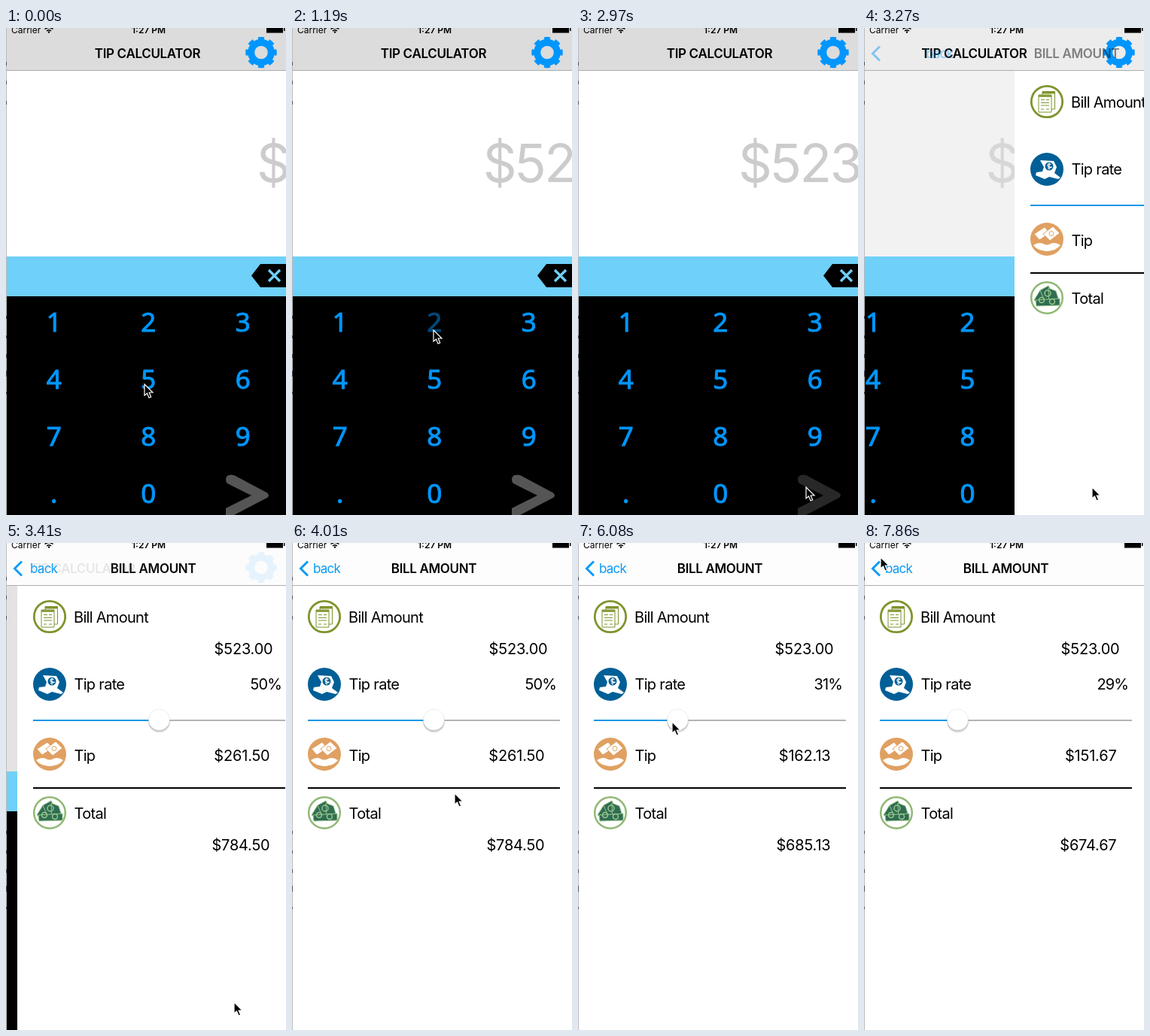
An HTML page that plays this animation: 372x648 px, repeating every 8 s.

```html
<!DOCTYPE html>
<html lang="en">
<head>
<meta charset="utf-8">
<title>Tip calculator</title>
<style>
  html, body { margin: 0; width: 100%; height: 100%; overflow: hidden; background: #fff; }
  svg { display: block; width: 372px; height: 648px; }
  text { font: 20px Inter, sans-serif; letter-spacing: -.035em; }
  .num { letter-spacing: -.01em; text-anchor: end; }
  #rate { letter-spacing: -.045em; }
  #back { font-size: 17px; letter-spacing: -.045em; }
  .title { font-size: 17px; font-weight: 600; letter-spacing: -.02em; text-anchor: middle; }
  .small { font-size: 12px; letter-spacing: 0; }
  .bold { font-weight: 600; }
  .key { font: 35px "Noto Sans", sans-serif; letter-spacing: 0; text-anchor: middle; fill: #0096fd; stroke: #0096fd; stroke-width: 1; }
  #entry { font-size: 70px; letter-spacing: -.035em; text-anchor: end; fill: #ccc; }
</style>
</head>
<body>
<svg viewBox="0 0 372 648">
  <g id="keypad">
    <rect y="57" width="372" height="247" fill="#fff"/>
    <text id="entry" x="375.500" y="205"></text>
    <rect id="shade" y="57" width="372" height="247" fill="#e2e2e2"/>
    <rect y="304" width="372" height="53" fill="#6fd0f9"/>
    <path d="M326 329.500L338 314H372V345H338Z"/>
    <path d="M349 322l15 15m0-15l-15 15" stroke="#6fd0f9" stroke-width="3.200"/>
    <rect y="357" width="372" height="291"/>
    <g id="keys"></g>
    <path id="next" fill="#555" d="M292 601Q292 593 303 595L347 618.500Q351 622 347 625L303 648H292V639L326 622L294 606Q292 604 292 601Z"/>
  </g>

  <g id="bill">
    <rect y="57" width="372" height="591" fill="#fff"/>
    <g transform="translate(43 98)" fill="#fff" stroke="#7d942d">
      <circle r="20.700" stroke-width="2.800"/>
      <path d="M-6-13.500H10.500V10H-6Z"/>
      <path d="M-6-12H10.500" stroke-width="3"/>
      <path d="M-11-9H6V14H-11Z"/>
      <path d="M-11-7.500H6" stroke-width="2.500"/>
      <path d="M-8-2.500h5m2 0h4M-8 1.500H3M-8 5H3M-8 10h4m3 0h4"/>
    </g>
    <g transform="translate(43 188)">
      <circle r="22" fill="#005f97"/>
      <path fill="#fff" d="M-9-12L9-11L13-3L10 5L18 11L15 13L3 10L-3 13L-15 8L-14 4L-6 3L-4-3Z"/>
      <circle cx="3" cy="-4" r="5.500" fill="#005f97"/>
      <path d="M5.500-6.500Q1-8 1-5.500T5-3T1-1.500M3-8.500V.5" fill="none" stroke="#fff" stroke-width="1.200"/>
    </g>
    <g transform="translate(43 281)" fill="#fff">
      <circle r="22" fill="#e0a062"/>
      <g stroke="#e0a062">
        <path d="M-17-7L-3-16L4-8L-10 1Z"/>
        <path d="M-5-7L8-17L17-8L4 2Z"/>
        <circle cx="6" cy="-7.500" r="3"/>
      </g>
      <path d="M-18 8Q-11 3-5 6Q0 9 5 6Q11 3 18 8Q13 14 6 15Q0 17-6 15Q-13 14-18 8Z"/>
    </g>
    <g transform="translate(43 359)" fill="#2f6d54" stroke="#9cc68a">
      <circle r="20.800" fill="#fff" stroke="#90b975" stroke-width="2.500"/>
      <path d="M-17 3L-9-10L3 1L-5 10Z"/>
      <path d="M-9-10L2-16L10 0L-3 4Z"/>
      <path d="M2-13L12-9L17 7L3 9Z"/>
      <path d="M-15 3L17 1V10L-14 11Z"/>
      <g fill="none" stroke-width="1.500"><circle cx="-7" cy="3" r="3.500"/><circle cx="1" cy="-6" r="4"/><circle cx="7" cy="5" r="3.500"/></g>
    </g>
    <text x="75" y="105.500">Bill Amount</text>
    <text class="num" x="339.500" y="148">$523.00</text>
    <text x="75.500" y="195">Tip rate</text>
    <text class="num" id="rate" x="351" y="195"></text>
    <text x="75.500" y="290">Tip</text>
    <text class="num" id="tip" x="335.500" y="290"></text>
    <text x="75.500" y="366.500">Total</text>
    <text class="num" id="total" x="335.500" y="408.500"></text>
    <path d="M21 326H356" stroke="#000" stroke-width="2"/>
    <path d="M21 236H356" stroke="#b3b3b3" stroke-width="2"/>
    <path id="track" stroke="#1496e6" stroke-width="2"/>
    <g id="knob">
      <circle cy="238" r="14.500" opacity=".1"/>
      <circle cy="236.500" r="14.600" opacity=".12"/>
      <circle cy="235" r="14" fill="#fff" stroke="#ddd" stroke-width=".5"/>
    </g>
  </g>

  <rect width="372" height="56" fill="#dcdcdc"/>
  <rect id="newBar" width="372" height="56" fill="#fdfdfd"/>
  <rect y="56" width="372" height="1" fill="#aeaeae"/>
  <g id="oldNav">
    <text class="title" id="oldTitle" x="188" y="40">TIP CALCULATOR</text>
    <g fill="none" stroke="#0096fd" transform="translate(339 32.500)">
      <circle r="13.300" stroke-width="9"/>
      <circle r="18.500" stroke-width="4.500" pathLength="16" stroke-dasharray="1.100 .9" stroke-dashoffset=".55"/>
    </g>
  </g>
  <g id="newNav">
    <text class="title" id="newTitle" x="188.500" y="40">BILL AMOUNT</text>
    <path d="M21 24.500L11.500 34L21 43.500" fill="none" stroke="#0a9af7" stroke-width="3"/>
    <text id="back" x="28" y="40" fill="#0a9af7">back</text>
  </g>
  <text class="small" x="7" y="6.500">Carrier</text>
  <text class="small bold" x="167" y="6.500">1:27 PM</text>
  <path d="M51.500 1.500Q57-2.500 62.500 1.500M54 4Q57 1.500 60 4" fill="none" stroke="#000" stroke-width="1.500"/>
  <circle cx="57" cy="5.500" r="1.200"/>
  <path d="M346-3H368V6.500H346ZM369 0h1.500v4H369Z"/>

  <rect width="1" height="648" fill="#bbb"/>
  <path d="M.5 45v5m0 20v5m0 22v5m0 281v4m0 22v4m0 21v5m0 17v8m0 20v3" stroke="#556"/>
  <path id="cursor" d="M0 0V15L3.500 12L6 18L8.700 17L6.200 11H11Z" stroke="#fff" stroke-width="1.200"/>
</svg>
<script>
const LOOP = 8000, STEP = 148.4, WIDTH = 372;
const $ = id => document.getElementById(id);
const move = (id, x, y = 0) => $(id).setAttribute("transform", `translate(${x} ${y})`);
const fade = (id, opacity) => $(id).setAttribute("opacity", opacity);

$("keys").innerHTML = [..."123456789.0"].map((key, i) =>
  `<text class="key" id="key${key}" x="${63.7 + i % 3 * 125.5}" y="${403.5 + Math.floor(i / 3) * 76}">${key}</text>`
).join("");

// Each stop is [step, ...values], joined by straight moves
const pointer = [
  [2, 184, 474], [6, 188, 402], [9, 188, 402], [13, 308, 402], [15, 308, 402],
  [19, 303, 611], [23, 303, 611], [24, 296, 580], [27, 216, 333], [29, 189, 246],
  [31, 187, 239], [33, 187, 239], [41, 125, 238], [44, 117, 239], [46, 117, 239],
  [47, 119, 242], [48, 119, 242], [49, 126, 266], [51, 62, 95], [52, 22, 10], [53, 22, 19]
];
const slider = [[33, 188.5], [41, 132.5], [44, 124.5]];
const slide = [[21, WIDTH], [22, 200], [23, 15], [24, 1], [25, 0]];
const presses = { key5: 1, key2: 7, key3: 14, next: 20 };

function at(stops, step) {
  const i = stops.findIndex(stop => stop[0] > step);
  if (i < 0) return stops[stops.length - 1].slice(1);
  if (i === 0) return stops[0].slice(1);
  const a = stops[i - 1], b = stops[i], u = (step - a[0]) / (b[0] - a[0]);
  return a.slice(1).map((v, j) => v + (b[j + 1] - v) * u);
}

function draw(step) {
  const typed = [2, 8, 15].filter(s => step >= s).length;
  $("entry").textContent = "$523".slice(0, typed + 1);
  for (const [id, start] of Object.entries(presses)) {
    const age = step - start;
    fade(id, age === 0 || age === 1 ? 0.48 : age === 2 ? 0.8 : 1);
  }

  const [offset] = at(slide, step), shown = 1 - offset / WIDTH;
  move("bill", offset);
  move("keypad", -0.3 * WIDTH * shown);
  fade("shade", shown);
  fade("newBar", shown);
  fade("oldNav", Math.min(1, (1 - shown) * 2));
  fade("newNav", shown);
  move("oldTitle", -90 * shown);
  move("newTitle", offset * 0.47);
  move("back", offset * 0.27);

  const [x] = at(slider, step), rate = Math.floor((x - 35) / 3.07), tip = 5.23 * rate;
  move("knob", x);
  $("track").setAttribute("d", `M21 236H${x}`);
  $("rate").textContent = rate + "%";
  $("tip").textContent = "$" + tip.toFixed(2);
  $("total").textContent = "$" + (523 + tip).toFixed(2);

  move("cursor", ...at(pointer, step));
}

let last = -1;
function tick() {
  const step = Math.floor((performance.now() % LOOP + 10) / STEP);
  if (step !== last) draw(last = step);
  requestAnimationFrame(tick);
}
tick();
</script>
</body>
</html>
```
